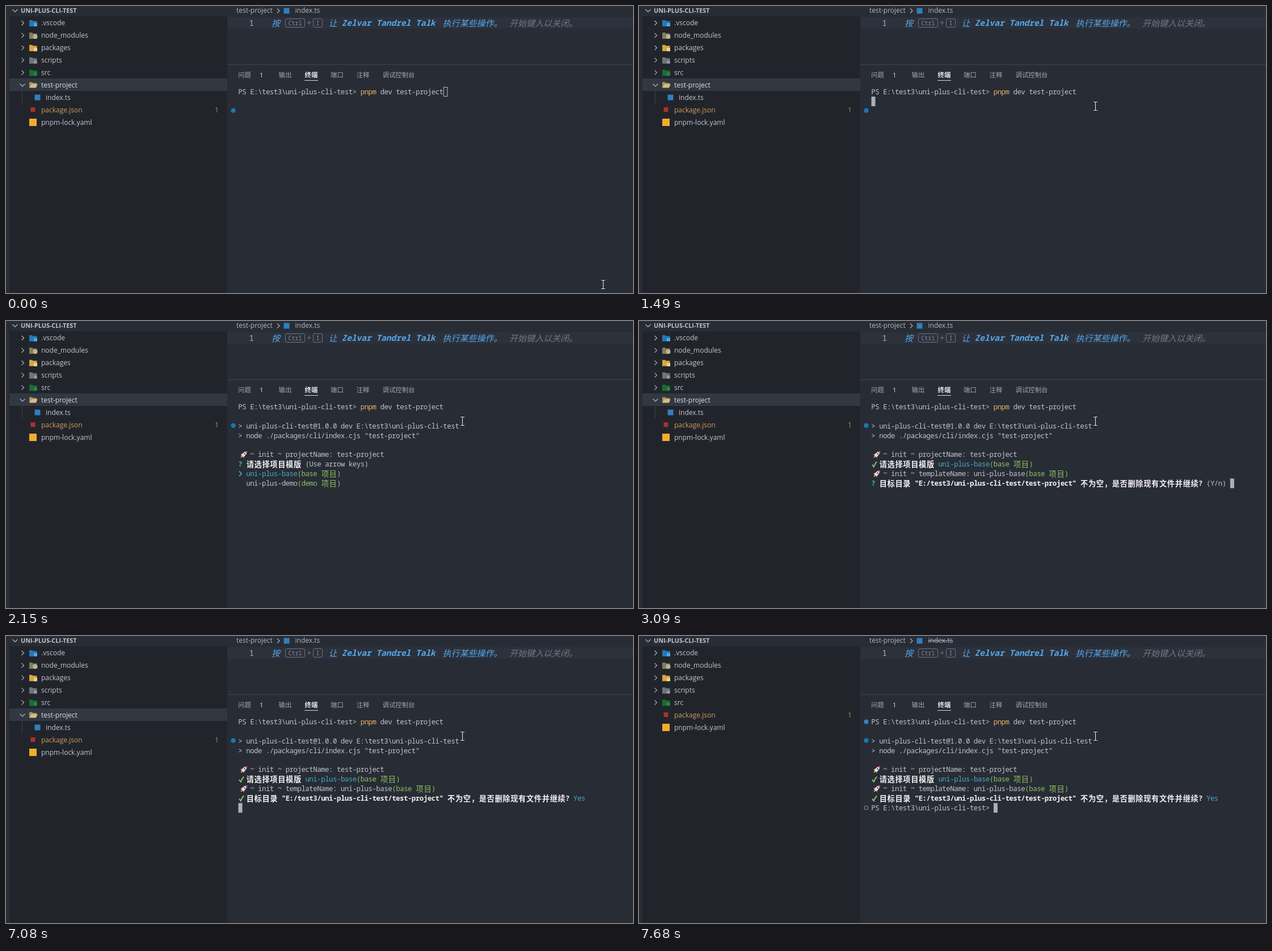
These frames come from a looping animation (1105 by 507 pixels, 8000 ms). An HTML page:

```html
<!DOCTYPE html>
<html lang="zh-CN">
<head>
<meta charset="utf-8">
<title>Project setup in a terminal</title>
<style>
html, body { margin: 0; width: 100%; height: 100%; overflow: hidden; background: #282c34; }
svg { display: block; width: 1105px; height: 507px; }
text { white-space: pre; }
.ui { font: 12px "Open Sans", "Noto Sans", sans-serif; }
.small { font: 11px "Open Sans", "Noto Sans", sans-serif; }
.head { font: 700 10.8px "Open Sans", "Noto Sans", sans-serif; }
.tab { font: 11.4px "Noto Sans CJK SC", "Noto Sans CJK", sans-serif; }
.mono { font: 500 12.4px "Noto Sans Mono", "DejaVu Sans Mono", monospace; letter-spacing: -.491px; }
.wide { font: 13.2px "Noto Sans CJK SC", "Noto Sans CJK", sans-serif; letter-spacing: .7px; }
.bold { font-weight: 700; }
.hint { font: italic 600 14.5px "Noto Sans Mono", monospace; }
.hintWide { font: italic 15px "Noto Sans CJK SC", "Noto Sans CJK", sans-serif; }
.key { font: 10px "Noto Sans Mono", monospace; }
.num { font: 14px "Noto Sans Mono", monospace; }
</style>
</head>
<body>
<svg id="stage" viewBox="0 0 1105 507" xmlns="http://www.w3.org/2000/svg"></svg>
<script>
const LOOP = 8000;
const CELL = 6.949, LINE = 16.88, LEFT = 409.5, TOP = 151.6;
const FG = '#bfc4cd', CYAN = '#45aac8', GREEN = '#8cc265', WHITE = '#f3f1f5', YELLOW = '#e9b267';
const SIDE = '#c3c6cd', ORANGE = '#d19a5b', BLUE = '#56a8ec', DIM = '#727885', RED = '#ee675c';

const esc = s => s.replace(/&/g, '&amp;').replace(/</g, '&lt;').replace(/>/g, '&gt;');
const text = (cls, x, y, s, fill) => `<text class="${cls}" x="${x}" y="${y}" fill="${fill}">${esc(s)}</text>`;
const rect = (x, y, w, h, fill, more = '') =>
  `<rect x="${x}" y="${y}" width="${w}" height="${h}" fill="${fill}" ${more}/>`;
const line = (d, color, width = 1) =>
  `<path d="${d}" fill="none" stroke="${color}" stroke-width="${width}"/>`;
const dot = (x, y, r, fill) => `<circle cx="${x}" cy="${y}" r="${r}" fill="${fill}"/>`;
const during = (from, to, body) => `<g data-from="${from}" data-to="${to}">${body}</g>`;

const right = (x, y) => line(`M${x - 2} ${y - 4}l4 4l-4 4`, '#b5b9c1', 1.1);
const down = (x, y) => line(`M${x - 4.5} ${y - 2}l4.5 4.5l4.5 -4.5`, '#b5b9c1', 1.1);

// Terminal helpers: positions are columns and rows, wide characters take two columns
const termX = col => LEFT + col * CELL;
const termY = row => TOP + row * LINE;

function put(col, row, s, fill = FG, bold = '') {
  let out = '';
  for (const run of s.match(/[\u3000-\u9fff\uff00-\uffef]+|[^\u3000-\u9fff\uff00-\uffef]+/g)) {
    const wide = run.charCodeAt(0) >= 0x3000;
    out += text(`${wide ? 'wide' : 'mono'} ${bold}`, termX(col) + (wide ? .3 : -.2), termY(row) + (wide ? 4.9 : 4.4), run, fill);
    col += run.length * (wide ? 2 : 1);
  }
  return out;
}

const block = (col, row) => rect(termX(col), termY(row) - 8.4, 7, 17, '#a9afbb');
const check = row => line(`M410.8 ${termY(row) + 1}l3 3.6q2 -5.6 5.4 -9`, GREEN, 2);

function rocket(row) {
  return `<g transform="translate(419 ${termY(row)}) rotate(45)">
    <path d="M-3 0L-5.2 4.5L-2 3.5ZM3 0L5.2 4.5L2 3.5Z" fill="#d8433f"/>
    <path d="M0 -8.5Q3.8 -4.5 2.6 4H-2.6Q-3.8 -4.5 0 -8.5Z" fill="#dfe4ea"/>
    <path d="M0 -8.5Q1.6 -7 2.3 -5H-2.3Q-1.6 -7 0 -8.5Z" fill="#d8433f"/>
    <path d="M-1.6 4.5H1.6L0 8Z" fill="#f3a33a"/>
    ${dot(0, -2, 1.5, '#3a7fb8')}</g>`;
}

// Sidebar
function folder(y, color, badge = '') {
  return `<path d="M41 ${y - 5}h5l1.5 1.5h7v9.5h-13.5Z" fill="${color}"/>` + badge;
}

function openFolder(y) {
  return `<path d="M41 ${y + 5}v-10h5l1.5 1.5h6.5v2h-9.5l-2.5 6.5Z" fill="#a8935f"/>
    <path d="M41.5 ${y + 5}l3 -6.5h11l-2.5 6.5Z" fill="#d5bd86"/>`;
}

const square = (x, y, size, fill) => rect(x - size / 2, y - size / 2, size, size, fill);
const label = (x, y, s, fill = SIDE) => text('ui', x, y + 4.3, s, fill);

function configFiles(y) {
  return square(47.5, y - .5, 8, '#a8322d') + label(62, y, 'package.json', ORANGE) +
    label(368, y, '1', '#b58a50') +
    square(47.5, y + 22, 13, '#f3ad2c') + label(62, y + 22, 'pnpm-lock.yaml');
}

function sidebar() {
  const folders = [
    ['.vscode', '#2777b8', square(52, 33, 6, '#4ba6e8')],
    ['node_modules', '#857d5c', dot(51.5, 54, 4, '#b9b698')],
    ['packages', '#d9a544', square(52, 77, 6, '#f0d08a')],
    ['scripts', '#6f747b', square(52, 99, 5, '#989da4')],
    ['src', '#1d6b35', square(52, 120, 5, '#2d8a48')]
  ];
  return rect(6, 18, 384, 489, '#21252b') + down(16, 8) +
    text('head', 26, 12, 'UNI-PLUS-CLI-TEST', SIDE) +
    folders.map(([name, color, badge], i) => {
      const y = 30 + i * 21.9;
      return right(29.5, y) + folder(y, color, badge) + label(62, y, name);
    }).join('') +
    during(0, 7680,
      rect(6, 128, 384, 22, '#323842') + down(29, 139.5) + openFolder(139.5) +
      label(62, 139.5, 'test-project', '#dcdfe4') +
      rect(28, 150, 1, 22, '#3c424c') + square(55.5, 161.5, 10, '#2f7fc0') + configFiles(183.5)) +
    during(0, 7410, label(70, 161.5, 'index.ts')) +
    during(7410, 7680, label(70, 161.5, 'index.ts', RED) + rect(70, 161.5, 43.5, 1, RED)) +
    during(7680, LOOP, configFiles(139.5));
}

// Editor and panel header
function editor() {
  const key = (x, w, s) => `<rect x="${x}" y="22.5" width="${w}" height="15" rx="2.5" fill="none" stroke="#6d7480"/>` +
    `<text class="key" x="${x + w / 2}" y="33.5" text-anchor="middle" fill="#858c99">${s}</text>`;
  const tabs = [[409, '问题'], [480.5, '输出'], [572, '端口'], [617.5, '注释'], [663.5, '调试控制台']];
  return rect(390, 19.5, 715, 20.5, '#2c313b') +
    label(406, 8, 'test-project', '#b2b7c0') + right(480, 8.5) + square(494.5, 8.5, 10, '#2f7fc0') +
    label(509.5, 8, 'index.ts', '#b2b7c0') + during(7410, LOOP, rect(509.5, 8, 43.5, 1, '#b2b7c0')) +
    text('num', 428.5, 35, '1', '#abb2bf') +
    text('hintWide', 468, 35.5, '按', BLUE) + key(492.5, 34, 'Ctrl') +
    text('num', 530, 35, '+', DIM) + key(541.5, 16, 'I') +
    text('hintWide', 568.5, 35.5, '让', BLUE) +
    text('hint', 591.5, 35, 'Zelvar Tandrel Talk', BLUE) +
    text('hintWide', 769.5, 35.5, '执行某些操作。', BLUE) +
    text('hintWide', 887, 35.5, '开始键入以关闭。', DIM) +
    rect(390, 103, 715, 1, '#3e434e') +
    tabs.map(([x, s]) => text('tab', x, 125.5, s, '#a1a7b2')).join('') +
    text('small', 447, 125.5, '1', '#e2e5ea') +
    text('tab bold', 526.5, 125.5, '终端', '#e8eaee') + rect(526, 131, 24, 1, '#d7dae0');
}

function terminal() {
  const prompt = 'PS E:\\test3\\uni-plus-cli-test> ';
  const question = '目标目录 "E:/test3/uni-plus-cli-test/test-project" 不为空，是否删除现有文件并继续?';
  const choose = put(2, 6, '请选择项目模版', WHITE, 'bold');
  const blocks = [
    [630, 1490, 52, 0], [1490, 2020, 0, 1], [2020, 2150, 0, 4], [3090, 6020, 91, 8],
    [6020, 7080, 92, 8], [7080, 7150, 0, 9], [7150, LOOP, 31, 9]
  ];
  return put(0, 0, prompt) + put(31, 0, 'pnpm', YELLOW) + put(36, 0, 'dev test-project') +
    dot(400.5, 184.7, 4.1, '#1d76b0') +
    during(0, 630, rect(termX(52) + .5, 143.5, 6.5, 16, 'none', 'stroke="#b5bac4"')) +
    during(2020, LOOP,
      put(0, 2, '> uni-plus-cli-test@1.0.0 dev E:\\test3\\uni-plus-cli-test') +
      put(0, 3, '> node ./packages/cli/index.cjs "test-project"')) +
    during(2150, LOOP, rocket(5) + put(3, 5, '~ init ~ projectName: test-project') + choose) +
    during(2150, 3090,
      put(0, 6, '?', CYAN, 'bold') + put(17, 6, '(Use arrow keys)') +
      line(`M411 ${termY(7) - 4.5}l4 4.5l-4 4.5`, CYAN, 1.8) +
      put(2, 7, 'uni-plus-base', CYAN) + put(15, 7, '(base 项目)', GREEN) +
      put(2, 8, 'uni-plus-demo') + put(15, 8, '(demo 项目)', GREEN)) +
    during(3090, LOOP,
      check(6) + put(17, 6, 'uni-plus-base', CYAN) + put(30, 6, '(base 项目)', GREEN) +
      rocket(7) + put(3, 7, '~ init ~ templateName: uni-plus-base') + put(39, 7, '(base 项目)', GREEN) +
      put(2, 8, question, WHITE, 'bold')) +
    during(3090, 7080, put(0, 8, '?', CYAN, 'bold') + put(85, 8, '(Y/n)')) +
    during(6020, 7080, put(91, 8, 'y')) +
    during(7080, LOOP, check(8) + put(85, 8, 'Yes', CYAN)) +
    during(7150, LOOP,
      put(0, 9, prompt) + dot(400.5, 151.6, 4.1, '#3583b8') +
      rect(397.5, 300.5, 6, 6, 'none', 'rx="1.8" stroke="#858b96" stroke-width="1.2"')) +
    blocks.map(([from, to, col, row]) => during(from, to, block(col, row))).join('');
}

const beam = 'M-3.5 -7.5H-1Q0 -7.5 0 -6.5V6.5Q0 7.5 -1 7.5H-3.5M3.5 -7.5H1Q0 -7.5 0 -6.5M0 6.5Q0 7.5 1 7.5H3.5';
const stage = document.getElementById('stage');
stage.innerHTML = rect(0, 0, 1105, 507, '#282c34') + sidebar() + editor() + terminal() +
  `<g id="pointer">${line(beam, '#15181d', 2.6)}${line(beam, '#e9ebee', 1.2)}</g>`;

const pointer = document.getElementById('pointer');
const timed = [...stage.querySelectorAll('[data-from]')].map(el => ({ el, from: +el.dataset.from, to: +el.dataset.to }));

function draw(t) {
  for (const { el, from, to } of timed) el.style.display = t >= from && t < to ? '' : 'none';
  // The pointer moves in 70 ms steps along a slightly bent path
  const k = Math.min(1, Math.floor(t / 70) / 8);
  const e = k * k * (3 - 2 * k);
  pointer.setAttribute('transform', `translate(${1052.5 - 248 * e} ${492 - 315 * e ** 1.38})`);
}

function tick() {
  draw(performance.now() % LOOP);
  requestAnimationFrame(tick);
}
tick();
</script>
</body>
</html>
```
